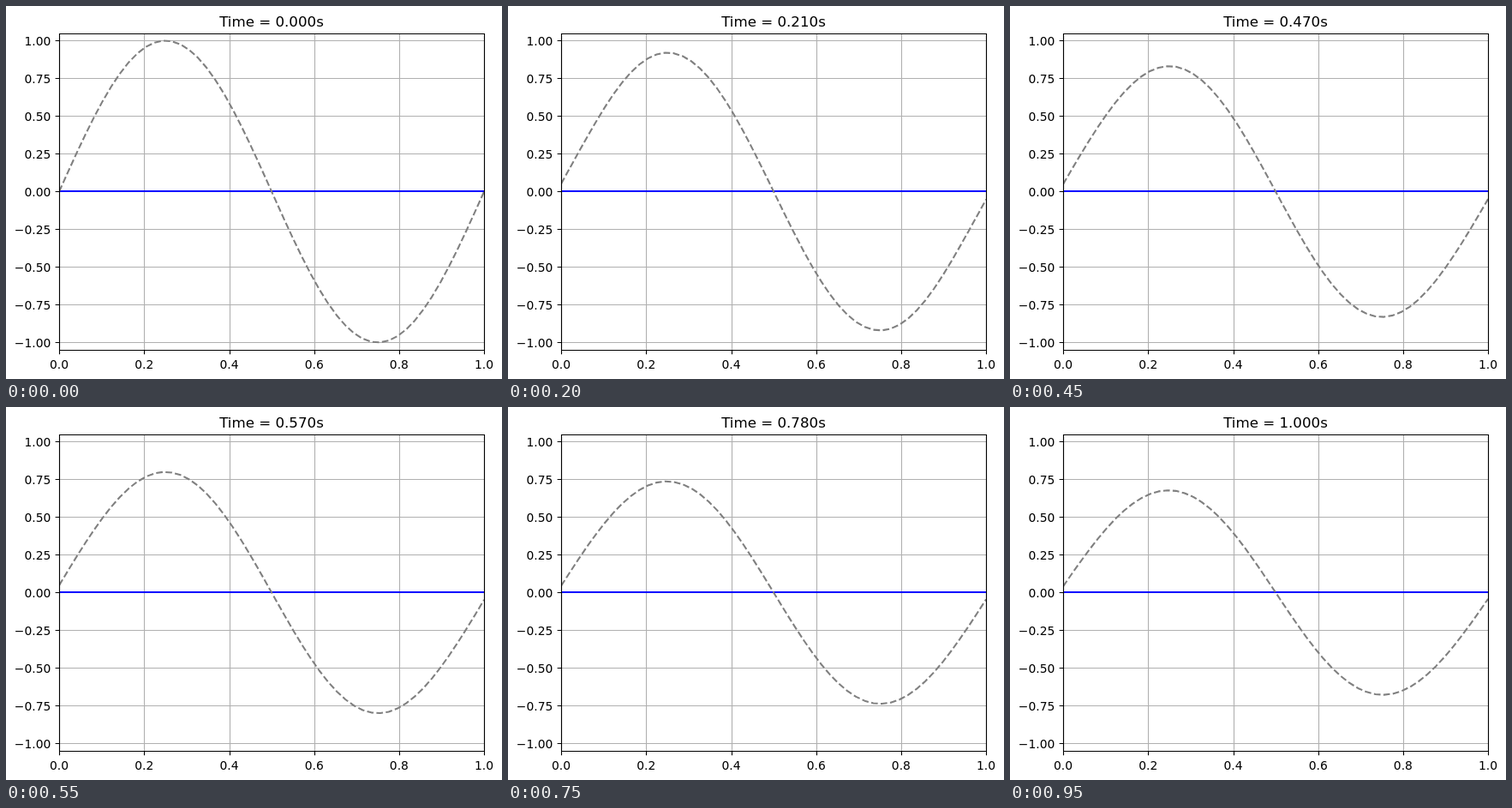
An HTML page that plays this animation: 579 px wide and 435 px high, repeating every 1 s.

```html
<!DOCTYPE html>
<html lang="en">
<head>
<meta charset="utf-8">
<title>Diffusion of a sine wave</title>
<style>
  html, body { margin: 0; width: 100%; height: 100%; overflow: hidden; background: #fff; }
  svg { display: block; }
  text { font-family: "DejaVu Sans", sans-serif; font-size: 13.89px; fill: #000; }
  #title { font-size: 16.67px; text-anchor: middle; }
  .x { text-anchor: middle; }
  .y { text-anchor: end; }
  path { fill: none; stroke-width: 1.11; }
  #grid { stroke: #b0b0b0; }
  #ticks, #frame { stroke: #000; }
  #zero { stroke: #00f; stroke-width: 2.08; }
  #wave { stroke: #808080; stroke-width: 2.08; stroke-dasharray: 7.71 3.33; stroke-linejoin: round; }
</style>
</head>
<body>
<svg width="579" height="435" viewBox="0 0 579 435">
  <clipPath id="area"><rect x="62" y="32" width="496.5" height="369.5"/></clipPath>
  <path id="grid"/>
  <path id="ticks"/>
  <g clip-path="url(#area)">
    <path id="zero" d="M62 216H558.5"/>
    <path id="wave"/>
  </g>
  <path id="frame" d="M62.5 32.5H558.5V401.5H62.5Z"/>
  <g id="labels"></g>
  <text id="title" x="310" y="24"></text>
</svg>
<script>
const LEFT = 62.1, WIDTH = 496, MID = 216.4, UNIT = 176;
const POINTS = 50, STEPS = 100, DT = 0.01, DIFFUSIVITY = 0.01;
const FRAMES = 20, FRAME_MS = 50;
const $ = id => document.getElementById(id);
const snap = v => Math.floor(v + 0.5) + 0.5;

function addLabel(kind, x, y, value, digits) {
  const label = document.createElementNS("http://www.w3.org/2000/svg", "text");
  label.setAttribute("class", kind);
  label.setAttribute("x", x);
  label.setAttribute("y", y);
  label.textContent = value.toFixed(digits).replace("-", "\u2212");
  $("labels").append(label);
}

function drawAxes() {
  let grid = "", ticks = "";
  for (let i = 0; i <= 5; i++) {
    const pos = LEFT + WIDTH * i / 5, x = snap(pos);
    grid += `M${x} 32V401.5`;
    ticks += `M${x} 401.5v4.86`;
    addLabel("x", pos, 422.5, i / 5, 1);
  }
  for (let i = -4; i <= 4; i++) {
    const y = snap(MID - UNIT * i / 4);
    grid += `M62.5 ${y}H558.5`;
    ticks += `M62.5 ${y}h-4.86`;
    addLabel("y", 52.4, y + 5.5, i / 4, 2);
  }
  $("grid").setAttribute("d", grid);
  $("ticks").setAttribute("d", ticks);
}

// Explicit heat equation; the first and last points are neighbours.
function solve() {
  const rate = DIFFUSIVITY * DT * (POINTS - 1) ** 2;
  let u = Array.from({ length: POINTS }, (_, i) => Math.sin(2 * Math.PI * i / (POINTS - 1)));
  const states = [u];
  for (let n = 0; n < STEPS; n++) {
    const prev = u;
    u = prev.map((v, i) =>
      v + rate * (prev[(i + 1) % POINTS] - 2 * v + prev[(i + POINTS - 1) % POINTS]));
    states.push(u);
  }
  return states;
}

const states = solve();
let shown = -1;

function draw(now) {
  const frame = Math.floor(now / FRAME_MS) % FRAMES;
  if (frame !== shown) {
    shown = frame;
    const step = Math.floor(frame * STEPS / (FRAMES - 1));
    const points = states[step].map((v, i) =>
      `${(LEFT + WIDTH * i / (POINTS - 1)).toFixed(2)} ${(MID - UNIT * v).toFixed(2)}`);
    $("wave").setAttribute("d", "M" + points.join("L"));
    $("title").textContent = `Time = ${(step * DT).toFixed(3)}s`;
  }
}

function tick(now) {
  draw(now);
  requestAnimationFrame(tick);
}

drawAxes();
draw(0);
requestAnimationFrame(tick);
</script>
</body>
</html>
```
